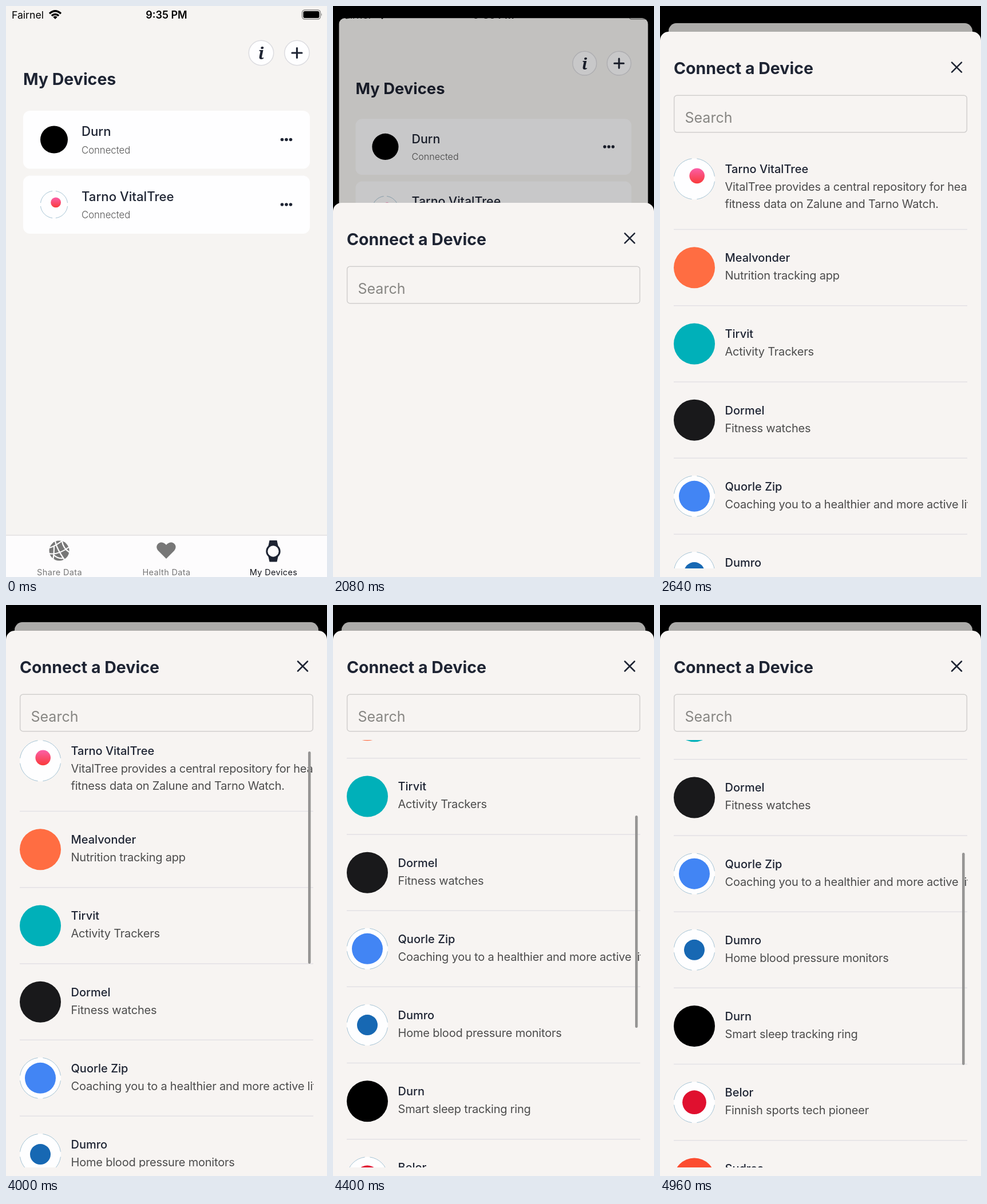
Animation of 561 by 998 pixels, one loop 5000 ms. Source, as an HTML page:

```html
<!DOCTYPE html>
<html lang="en">
<head>
<meta charset="utf-8">
<title>Connect a Device</title>
<style>
  html, body { margin: 0; height: 100%; overflow: hidden; background: #000; }
  svg { display: block; width: 100%; height: 100%; font-family: Inter, sans-serif; fill: #1e2433; }
  .heading { font-size: 28.5px; font-weight: 700; }
  .card-name { font-size: 22.2px; font-weight: 500; }
  .card-state { font-size: 16.7px; font-weight: 300; fill: #555; }
  .tab { font-size: 14.5px; letter-spacing: .35px; text-anchor: middle; fill: #777; }
  .name { font-size: 20px; font-weight: 500; }
  .about { font-size: 20px; letter-spacing: -.01em; fill: #4c4c4c; }
  .ring { fill: none; stroke: #a5c3d4; stroke-dasharray: .84 .16; stroke-dashoffset: -.08; }
  .line { fill: none; stroke: #1e2433; stroke-linecap: round; }
</style>
</head>
<body>
<svg viewBox="0 0 561 998" preserveAspectRatio="none">
  <defs>
    <clipPath id="viewport"><rect x="23" y="191" width="514.5" height="747"/></clipPath>
    <linearGradient id="pink" x2="0" y2="1">
      <stop stop-color="#fb5fa8"/><stop offset="1" stop-color="#f93a3a"/>
    </linearGradient>
  </defs>
  <rect width="561" height="998" fill="#000"/>

  <g id="page">
    <rect id="pageBack" width="561" height="998" fill="#f6f4f2"/>
    <g fill="#fefeff" stroke="#dcdce0" stroke-width="1.5">
      <circle cx="446" cy="82" r="21.7"/><circle cx="508.5" cy="82" r="21.7"/>
    </g>
    <text x="446" y="93" text-anchor="middle" font-family="Noto Serif, serif" font-size="29" font-weight="700" font-style="italic">i</text>
    <path class="line" stroke-width="3.2" d="M500 82h17M508.5 73.5v17"/>
    <text class="heading" x="30" y="138">My Devices</text>
    <g id="cards"></g>
    <rect y="925" width="561" height="73" fill="#fdfcfd"/>
    <path d="M0 925h561" stroke="#e2e0e0" stroke-width="1.5"/>
    <circle cx="93" cy="952" r="17.5" fill="#777"/>
    <path d="M76 947Q88 943 99 934M86 935Q88 948 103 969M75 957Q92 960 111 945M98 936Q100 948 111 955M84 943Q84 960 82 968M83 959Q91 967 101 965" fill="none" stroke="#fdfcfd" stroke-width="2.2"/>
    <path d="M280 966L266 952C260 945 265 937.5 272 937.5Q277 938 280 942Q283 938 288 937.5C295 937.5 300 945 294 952Z" fill="#777"/>
    <path d="M458 946L460.5 934H473.5L476 946ZM458 960L460.5 971.5H473.5L476 960Z"/>
    <circle cx="467" cy="953" r="11.2" fill="#fdfcfd" stroke="#1e2433" stroke-width="3"/>
    <text class="tab" x="93.5" y="994.5">Share Data</text>
    <text class="tab" x="280.5" y="994.5">Health Data</text>
    <text class="tab" x="467.5" y="994.5" style="fill:#16181f">My Devices</text>
    <rect id="dim" width="561" height="998" fill="#000"/>
  </g>

  <g fill="#000">
    <text x="10" y="21.5" font-size="17.6">Fairnel</text>
    <text x="280.5" y="21.5" font-size="18" font-weight="600" text-anchor="middle">9:35 PM</text>
    <path d="M76 13.2Q86 4.5 96 13.2M79.8 17Q86 11.8 92.2 17" fill="none" stroke="#000" stroke-width="3.4"/>
    <path d="M82.3 19.3Q86 16.4 89.7 19.3L86 23Z"/>
    <rect x="517.5" y="7" width="32" height="16" rx="4.5" fill="none" stroke="#000" stroke-opacity=".45" stroke-width="1.4"/>
    <rect x="519.5" y="9" width="28" height="12" rx="2.8"/>
    <path d="M551 12.5q2 2.5 0 5z" fill-opacity=".45"/>
  </g>

  <g id="sheet">
    <rect width="561" height="1020" rx="15" fill="#f7f4f2"/>
    <text class="heading" x="24" y="74">Connect a Device</text>
    <path class="line" stroke-width="2.5" d="M510 53.5l17 17m0-17l-17 17"/>
    <rect x="24.7" y="111.2" width="511.6" height="64.6" rx="5" fill="none" stroke="#d1cfce" stroke-width="1.5"/>
    <text x="43.5" y="159" font-size="25" fill="#878683">Search</text>
    <g id="list" clip-path="url(#viewport)"><g id="rows"></g></g>
    <rect id="bar" x="528" width="4.6" height="371" rx="2.3" fill="#969594"/>
  </g>
</svg>
<script>
const $ = id => document.getElementById(id);
const LOOP = 5000, STEP = 40, OPEN = 2000, LIST = 2400, BADGES = 2560, SCROLL = 4000;

const text = (kind, x, y, words) => `<text class="${kind}" x="${x}" y="${y}">${words}</text>`;
const disc = (x, y, r, fill) => `<circle cx="${x}" cy="${y}" r="${r}" fill="${fill}"/>`;

// A badge is a filled disc, or a white ringed one with a small disc inside.
function badge(x, y, r, { fill, spot, size = .58, dx = 0, dy = 0 }) {
  if (fill) return disc(x, y, r, fill);
  return disc(x, y, r, '#fefeff') +
    `<circle class="ring" pathLength="4" cx="${x}" cy="${y}" r="${r - .3}"/>` +
    disc(x + dx * r, y + dy * r, size * r, spot);
}

const pink = { spot: 'url(#pink)', size: .37, dx: .13, dy: -.15 };
const black = { fill: '#000' };

const card = (y, name, look) =>
  `<rect x="30" y="${y}" width="501" height="101.5" rx="12" fill="#fefeff"/>` +
  badge(84, y + 50.5, 24, look) +
  text('card-name', 132, y + 44, name) + text('card-state', 132, y + 74.5, 'Connected') +
  [482.5, 490, 497.5].map(x => disc(x, y + 50.5, 2.8, '#1e2433')).join('');

$('cards').innerHTML = card(183, 'Durn', black) + card(296.5, 'Tarno VitalTree', pink);

const devices = [
  ['Tarno VitalTree', pink, 'VitalTree provides a central repository for health and', 'fitness data on Zalune and Tarno Watch.'],
  ['Mealvonder', { fill: '#ff6d42' }, 'Nutrition tracking app'],
  ['Tirvit', { fill: '#00b0b9' }, 'Activity Trackers'],
  ['Dormel', { fill: '#19191b' }, 'Fitness watches'],
  ['Quorle Zip', { spot: '#4285f4', size: .75 }, 'Coaching you to a healthier and more active lifestyle'],
  ['Dumro', { spot: '#1768b3', size: .5 }, 'Home blood pressure monitors'],
  ['Durn', black, 'Smart sleep tracking ring'],
  ['Belor', { spot: '#e0102f' }, 'Finnish sports tech pioneer'],
  ['Sudrea', { fill: '#fc4c30' }, 'Track your runs and rides'],
];

$('rows').innerHTML = devices.map(([name, look, ...about], i) => {
  const y = i ? 412.2 + 133.2 * (i - 1) : 257.2;
  const rule = y + (i ? 66.5 : 88.3);
  return `<g class="badge">${badge(60, y, 36, look)}</g>` + text('name', 113.5, y - 10, name) +
    about.map((words, n) => text('about', 113.5, y + 21 + 30 * n, words)).join('') +
    `<path d="M24 ${rule}h513" stroke="#e3e1e5" stroke-width="1.5"/>`;
}).join('');

const badges = document.querySelectorAll('.badge');
const show = (el, on) => el.setAttribute('visibility', on ? 'inherit' : 'hidden');

// Distance left on a critically damped spring.
const springRest = ms => (1 + .0191 * ms) * Math.exp(-.0191 * ms);

function draw(t) {
  const open = t >= OPEN, scrolling = t >= SCROLL;
  const p = open ? 1 - springRest(t - OPEN + 50) : 0;
  const scale = 1 - .0532 * p;
  $('page').setAttribute('transform', `translate(${280.5 * (1 - scale)} ${30 * p}) scale(${scale})`);
  $('pageBack').setAttribute('rx', 15 * p);
  $('dim').setAttribute('rx', 15 * p);
  $('dim').setAttribute('opacity', .3 * p);

  show($('sheet'), open);
  $('sheet').setAttribute('transform', `translate(0 ${45 + 953 * springRest(t - OPEN + 44.4)})`);
  show($('list'), open && t >= LIST);
  badges.forEach(b => show(b, t >= BADGES));

  const offset = scrolling ? 457.5 * (1 - Math.exp(-.00188 * (t - SCROLL + 36))) : 0;
  $('rows').setAttribute('transform', `translate(0 ${-offset})`);
  show($('bar'), scrolling);
  $('bar').setAttribute('y', 196.1 + .4956 * offset);
}

const start = performance.now();
function frame() {
  const t = (performance.now() - start) % LOOP;
  draw(Math.floor(t / STEP) * STEP);
  requestAnimationFrame(frame);
}
frame();
</script>
</body>
</html>
```
